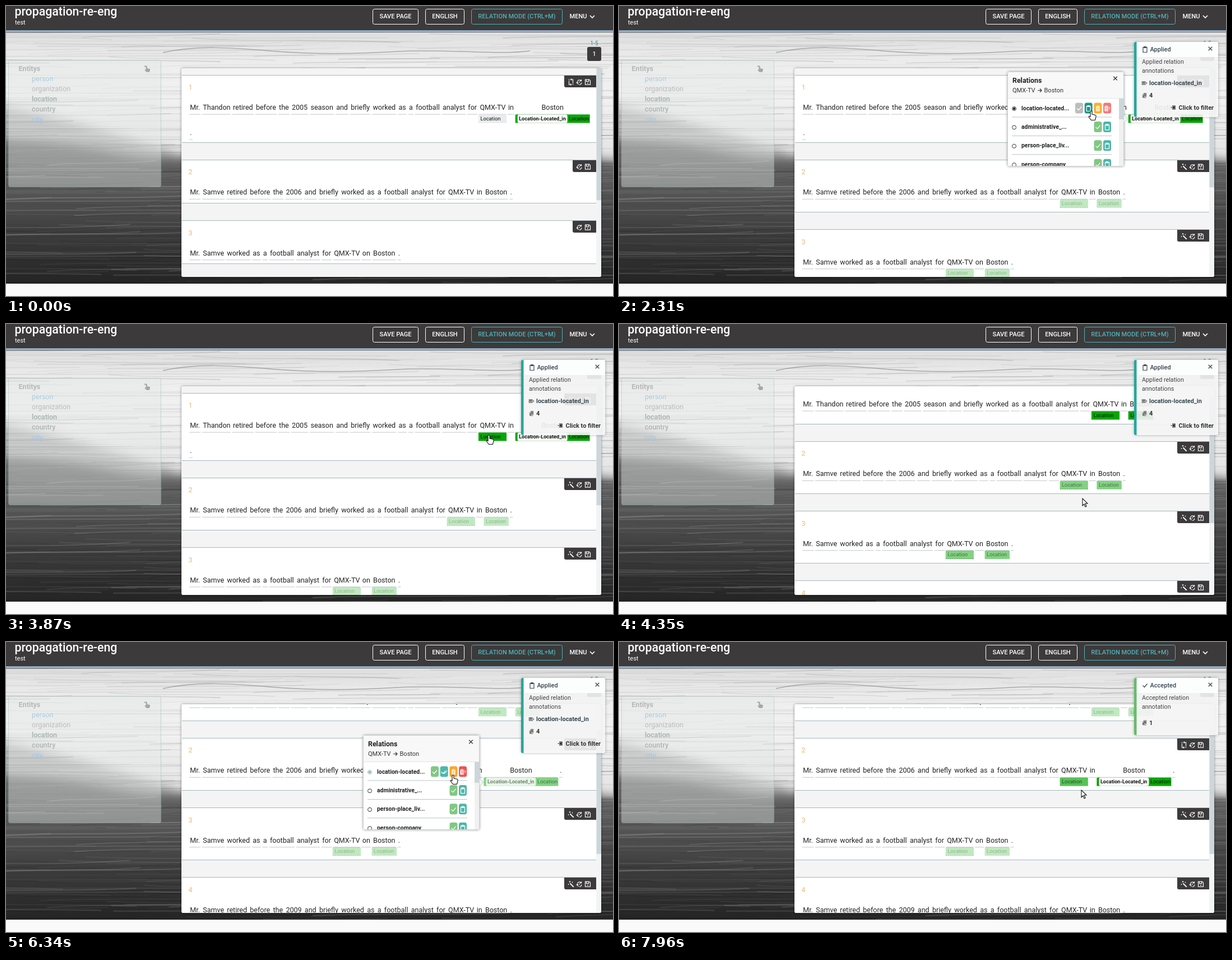
Recreate the animation shown at these times as an HTML page with a canvas. Size 1083 by 517 pixels, loop 8 s.

```html
<!DOCTYPE html>
<html lang="en">
<head>
<meta charset="utf-8">
<title>Relation annotation</title>
<style>
html, body { margin: 0; width: 100%; height: 100%; overflow: hidden; background: #fafafa; }
canvas { display: block; }
</style>
</head>
<body>
<canvas id="stage" width="1083" height="517"></canvas>
<script>
const stage = document.getElementById('stage');
let ctx = stage.getContext('2d');
const LOOP = 8000, DARK = '#3c3a3b', GREEN = '#06a606', TEAL = '#26a69a';
const STATION = 'QMX-TV', WORD_GAP = 5.32;
const slots = { Thandon: 48.3, Samve: 37.7, [STATION]: 45.2 };
const sentences = [
  `Mr. Thandon retired before the 2005 season and briefly worked as a football analyst for ${STATION} in Boston .`,
  `Mr. Samve retired before the 2006 and briefly worked as a football analyst for ${STATION} in Boston .`,
  `Mr. Samve worked as a football analyst for ${STATION} on Boston .`,
  `Mr. Samve retired before the 2009 and briefly worked as a football analyst for ${STATION} in Boston .`,
  `Mr. Samve worked as a football analyst for ${STATION} in Boston .`,
].map(s => s.split(' '));

const icons = {
  check: 'M-4 0l3 3 5-6',
  checks: 'M-5 0l3 3 4-5M-.5 2l1 1 4.5-5',
  clip: 'M-3.5-4h7v9h-7zM-1.5-5h3v2h-3z',
  bin: 'M-2.5-2h5v6.5h-5zM-3.5-3.5h7M-1-4.5h2M-2-1v5M0-1v5M2-1v5',
  binAll: 'M-4-2h5v6.5h-5zM-5-3.5h7M-2.5-4.5h2M-3-1v5M-1-1v5M3-2h2M3 0h2M3 2h1',
  close: 'M-3.3-3.3l6.6 6.6m0-6.6l-6.6 6.6',
  branch: 'M-3.5-5v2M-3.500-2v6.500h3M-1 3l1.500 1.500-1.500 1.500M3.500 5v-2M3.500 2v-6.500h-3M1-6l-1.500 1.500 1.500 1.500',
  wand: 'M5 5l-6.500-6.500M4.300 5.300l-6-6M-2-5.500v2.500M-3.300-4.200h2.600M2.500-4v2M-4.500-.5v2',
  cycle: 'M-3.500-1a4 4 0 0 1 7-1M3.500-4.500v2.700h-2.700M4 1a4 4 0 0 1-3 3.500M2 4.500h-2M-1 4a4 4 0 0 1-3-3.500M-5 2l1-2 2 1M-1 0h2',
  save: 'M-4.500-4.500h7l2 2v7h-9zM-2.500-4v3h4v-3M-1 2h2',
  tag: 'M-4-2h5l3 2.500-3 2.500h-5zM-3-.5h4M-3 1h4',
  copy: 'M-1-4h4v6h-4zM-4-1h3v5h4M0-3v4M1-3v4M2-3v4M-3 0v4M-2 0v4',
  enter: 'M-2-3h5v6h-5M-4.500 0h5M-1-2l2 2-2 2M1.500-2v4',
  arrow: 'M-4 0h7M0-3l3 3-3 3',
  chevron: 'M-4-2l4 4 4-4',
};
for (const name in icons) icons[name] = new Path2D(icons[name]);
const pointer = new Path2D('M0 0v13l3-3 2 5 2-1-2-5h4z');
const hand = new Path2D('M-2 1q1.500-2 3 0v5l6 1.500q1.500.5 1 3l-1.500 6h-7l-4-5q-1-2 .5-2l2 1z');

const ramp = (t, a, b) => {
  const k = Math.min(1, Math.max(0, (t - a) / (b - a)));
  return k * k * (3 - 2 * k);
};
const mix = (a, b, k) => a + (b - a) * k;

function text(s, x, y, size, color, weight = 400, align = 'left') {
  ctx.font = `${weight} ${size}px Roboto, sans-serif`;
  ctx.textAlign = align;
  ctx.fillStyle = color;
  ctx.fillText(s, x, y);
}
function box(x, y, w, h, fill, radius = 0, stroke) {
  ctx.beginPath();
  ctx.roundRect(x, y, w, h, radius);
  if (fill) { ctx.fillStyle = fill; ctx.fill(); }
  if (stroke) { ctx.strokeStyle = stroke; ctx.lineWidth = 1; ctx.stroke(); }
}
function icon(name, x, y, color, width = 1.2) {
  ctx.save();
  ctx.translate(x, y);
  ctx.strokeStyle = color;
  ctx.lineWidth = width;
  ctx.stroke(icons[name]);
  ctx.restore();
}
function group(alpha, draw) {
  if (alpha <= 0) return;
  ctx.save();
  ctx.globalAlpha *= alpha;
  draw();
  ctx.restore();
}
function shadow(blur, color) {
  ctx.shadowBlur = blur;
  ctx.shadowColor = color;
}
function fadeDown(y0, y1, greys) {
  const fade = ctx.createLinearGradient(0, y0, 0, y1);
  greys.forEach((v, i) => fade.addColorStop(i / (greys.length - 1), `rgb(${v},${v},${v})`));
  return fade;
}

// Static layer: brushed backdrop, header, entity list.
function paintBackdrop() {
  ctx.save();
  ctx.beginPath();
  ctx.rect(0, 47, 1083, 448);
  ctx.clip();
  box(0, 47, 1083, 448, fadeDown(47, 290, [222, 238, 240, 232, 225]));
  ctx.filter = 'blur(9px)';
  ctx.fillStyle = 'rgba(90,90,90,.4)';
  ctx.fill(new Path2D('M-40 172Q80 195 190 228T300 262V300H-40Z'));
  ctx.fillStyle = fadeDown(230, 495, [112, 96, 84, 66, 50, 36]);
  ctx.fill(new Path2D('M-40 236Q100 240 180 258T310 268L1000 268L1130 280V540H-40Z'));
  ctx.filter = 'none';
  let seed = 7;
  const rnd = () => (seed = seed * 16807 % 2147483647) / 2147483647;
  for (let i = 0; i < 650; i++) {
    const y = 45 + rnd() * 455, x = rnd() * 1300 - 300, len = 180 + rnd() * 400;
    const tone = rnd() < .5 ? 255 : 25, bend = 10 * rnd() - 4;
    ctx.strokeStyle = `rgba(${tone},${tone},${tone},${.03 + rnd() * .13})`;
    ctx.lineWidth = .5 + rnd() * 1.8;
    ctx.beginPath();
    ctx.moveTo(x, y + bend);
    ctx.bezierCurveTo(x + len * .3, y - bend, x + len * .6, y + bend, x + len, y - bend);
    ctx.stroke();
  }
  ctx.strokeStyle = 'rgba(70,70,70,.4)';
  ctx.lineWidth = 1.5;
  ctx.stroke(new Path2D('M280 83C340 70 400 74 470 80S620 86 700 81 880 88 935 80'));
  ctx.restore();
  box(0, 495, 1083, 22, '#fafafa');
}
function paintHeader() {
  box(0, 0, 1083, 43, DARK);
  box(0, 43, 1083, 1, '#6d7f90');
  box(0, 44, 1083, 2, '#a9c9e8');
  box(0, 46, 1083, 1, '#4d5560');
  text('propagation-re-eng', 15.5, 16.5, 21.3, '#fff', 500);
  text('test', 16, 32.5, 11, '#fff');
  [['SAVE PAGE', 654, 82, '#fff'], ['ENGLISH', 748, 70, '#fff'], ['RELATION MODE (CTRL+M)', 830, 163, '#4fb3b8']]
    .forEach(([label, x, w, color]) => {
      box(x + .5, 5.5, w - 1, 27, null, 3, color);
      text(label, x + w / 2, 22.3, 11.1, color, 500, 'center');
    });
  text('MENU', 1005.5, 22.3, 11.1, '#fff', 500);
  icon('chevron', 1046, 19, '#fff', 1.7);
}
function paintEntities() {
  box(4.5, 96.5, 272, 226, 'rgba(225,231,229,.42)', 3, 'rgba(140,180,170,.4)');
  text('Entitys', 22.5, 115.5, 12.6, '#b6b8b8', 700);
  [['person', '#abcbdc'], ['organization', '#bbbcbc'], ['location', '#a5b2ae', 500],
   ['country', '#b0b3b3', 500], ['city', '#a9c6e2', 500]]
    .forEach(([name, color, weight], i) => text(name, 46, 133.5 + i * 18.3, 12.5, color, weight));
  ctx.save();
  ctx.translate(251, 107);
  ctx.scale(.75, .65);
  ctx.fillStyle = '#a5a7a7';
  ctx.fill(hand);
  ctx.restore();
  box(246.5, 106.5, 5, 2, '#a5a7a7', 1);
}

function tag(x, y, w, fill, alpha, pending) {
  group(alpha, () => {
    box(x, y, w, 15, fill);
    text('Location', x + 3.5, y + 10, 9.3, '#111');
    if (!pending) return;
    ctx.setLineDash([2, 2]);
    ctx.lineWidth = 1;
    ctx.strokeStyle = '#2c5c2c';
    ctx.beginPath();
    ctx.moveTo(x, y + 14.5);
    ctx.lineTo(x + w, y + 14.5);
    ctx.stroke();
  });
}
function relationTag(x, y, alpha) {
  group(alpha, () => {
    box(x, y, 133, 15, GREEN);
    text('Location', x + 95.5, y + 10, 9.3, '#111');
  });
  group(Math.min(1, alpha + .3), () => box(x + 4, y, 89, 15, '#fff', 3));
  group(alpha, () => text('Location-Located_in', x + 6.5, y + 10.5, 9.15, '#111', 700));
}

function drawWords(words, top, s) {
  let x = 328.3, line = top;
  for (const word of words) {
    ctx.font = '400 12.5px Roboto, sans-serif';
    const own = slots[word] ?? ctx.measureText(word).width;
    const place = word === 'Boston', wide = place && s.related;
    const w = wide ? 128 : own;
    if (x + w > 1043) { x = 328.3; line += 45; }
    text(word, x + (w - own) / 2, line + 61.5, 12.5, '#222');
    box(x - 1.3, line + 69, w + 2.6, 1.2, '#ccd3d8');
    if (s.tagged && (place || word === STATION)) {
      if (wide) relationTag(x - 2.5, line + 70, s.relAlpha);
      else tag(x - 2.5, line + 70, w + 5, place ? GREEN : s.fill || GREEN, place ? s.alpha : s.stationAlpha ?? s.alpha, s.pending && !place);
    }
    x += w + WORD_GAP;
  }
}
function drawTools(top, names) {
  const left = 1053 - (names.length > 2 ? 57 : 42);
  box(left, top, 1053 - left, 21, DARK, [0, 0, 0, 3]);
  names.forEach((name, i) => icon(name, 1038 - 15 * (names.length - 1 - i), top + 11.5, '#f2f2f2', 1.25));
}

function drawList(t) {
  const applied = t >= 2310, accepted = t >= 6880, open1 = t < 4020;
  const scroll = 38 * (ramp(t, 4100, 4260) + ramp(t, 4400, 4540));
  const wake = ramp(t, 3950, 4300), dim = ramp(t, 4750, 5250);
  const soft = mix(.25, .5, wake), rest = mix(soft, .25, dim);
  const states = sentences.map((_, i) => ({ tagged: applied, pending: true, alpha: rest }));
  states[0] = { tagged: true, related: open1, relAlpha: 1, alpha: mix(1, .25, dim), fill: t < 2970 ? '#e9ecec' : GREEN };
  states[1] = {
    tagged: applied, pending: !accepted, related: t >= 4900, alpha: soft, relAlpha: accepted ? 1 : .5,
    stationAlpha: accepted ? mix(.42, .68, ramp(t, 7400, 7960)) : mix(soft, .42, dim),
  };
  const heights = sentences.map((_, i) => i === 0 ? (open1 ? 120 : 93) : applied ? 93 : 77);
  const content = 160 + heights.reduce((a, b) => a + b);

  ctx.save();
  shadow(4, 'rgba(0,0,0,.4)');
  box(313, 111, 749, 372, '#f4f4f4', 3);
  ctx.restore();
  ctx.save();
  ctx.beginPath();
  ctx.roundRect(313, 111, 749, 372, 3);
  ctx.clip();
  let top = 123.5 - scroll;
  sentences.forEach((words, i) => {
    const h = heights[i], y = Math.round(top), bottom = Math.round(top + h);
    box(314, y, 739, bottom - y, '#fff');
    box(314, y - 1, 739, 1, '#a3b8ba');
    box(314, bottom - 1, 739, 1, '#a3b8ba');
    text(i + 1, 325.5, top + 25.5, 12.5, '#efc88f', 500);
    drawWords(words, top, states[i]);
    const tools = ['cycle', 'save'];
    if (i === 0 && !applied || i === 1 && accepted) tools.unshift('branch');
    else if (applied) tools.unshift('wand');
    drawTools(y, tools);
    top += h + 31.3;
  });
  box(1053.5, 111, 8.5, 372, '#f2f4f5');
  box(1053.5, 111 + scroll * 372 / content, 8.5, 372 * 372 / content, '#cdd6db');
  ctx.restore();
}

function actionButton(x, y, name, color) {
  box(x - 7, y - 9.5, 14, 19, color, 3.5);
  icon(name, x, y + .5, '#fff', 1.2);
}
function drawPopup(x, y, marked, actions) {
  ctx.save();
  shadow(4, 'rgba(0,0,0,.4)');
  box(x, y, 208, 169, '#fff', 3);
  ctx.restore();
  ctx.fillStyle = '#f1f3f3';
  ctx.strokeStyle = '#c4cccc';
  ctx.lineWidth = 1;
  ctx.beginPath();
  ctx.moveTo(x + 208, y + 77);
  ctx.lineTo(x + 215, y + 84);
  ctx.lineTo(x + 208, y + 91);
  ctx.fill();
  ctx.stroke();
  ctx.beginPath();
  ctx.roundRect(x, y, 208, 169, 3);
  ctx.clip();
  box(x, y, 208, 47.5, '#f8f8f8');
  box(x, y + 47, 208, 1, '#e2e4e4');
  text('Relations', x + 9, y + 20, 12.4, '#222', 700);
  text(STATION, x + 9, y + 36.5, 11, '#333');
  icon('arrow', x + 58, y + 33.5, '#333');
  text('Boston', x + 65.5, y + 36.5, 11, '#333');
  icon('close', x + 192.5, y + 12, '#333', 1.3);
  ['location-located...', 'administrative_...', 'person-place_liv...', 'person-company'].forEach((name, i) => {
    const row = y + 65 + i * 33.4;
    ctx.beginPath();
    ctx.arc(x + 12, row + 1, 3.5, 0, 7);
    ctx.strokeStyle = i || marked === '#222' ? '#333' : '#9bbcb6';
    ctx.lineWidth = 1;
    ctx.stroke();
    if (!i) {
      ctx.beginPath();
      ctx.arc(x + 12, row + 1, 2.2, 0, 7);
      ctx.fillStyle = marked;
      ctx.fill();
    }
    text(name, x + 25, row + 3.5, 10.4, '#222', 700);
    if (i) {
      actionButton(x + 161.5, row, 'check', '#81c784');
      actionButton(x + 178, row, 'clip', '#4db6ac');
    } else actions.forEach(([glyph, color], k) => actionButton(x + 128 + k * 16.7, row, glyph, color));
    box(x + 8, row + 15.5, 178, 1, '#b9c4c6');
  });
  box(x + 199, y + 48, 8.5, 121, '#f1f1f1');
  box(x + 199, y + 48, 8.5, 37, '#cdd6db');
  box(x + .5, y + .5, 207, 168, null, 3, '#d0d4d4');
}

function drawToast(h, color, glyph, title, lines) {
  ctx.save();
  shadow(5, 'rgba(0,0,0,.35)');
  box(919, 64, 150, h, 'rgba(255,255,255,.87)', 3);
  ctx.restore();
  box(919, 64, 150, 27, '#fcfdfd', [3, 3, 0, 0]);
  box(919, 64, 4.5, h, color, [3, 0, 0, 3]);
  icon(glyph, 938.5, 77.5, '#37474f');
  text(title, 947.5, 81.3, 11, '#37474f', 500);
  icon('close', 1055, 76, '#555', 1.6);
  lines.forEach((line, i) => text(line, 933, 102.5 + i * 16, 10.8, '#444'));
}
function appliedToast() {
  drawToast(134, TEAL, 'clip', 'Applied', ['Applied relation', 'annotations']);
  icon('tag', 937.5, 137, '#777', 1.5);
  text('location-located_in', 946, 140.5, 10.9, '#37474f', 700);
  icon('copy', 937.5, 159.5, '#777');
  text('4', 946, 163, 11, '#333', 700);
  icon('enter', 989, 181, '#222');
  text('Click to filter', 998.5, 185, 10.9, '#333', 700);
}
function acceptedToast() {
  drawToast(102, '#66bb6a', 'check', 'Accepted', ['Accepted relation', 'annotation']);
  icon('copy', 937.5, 144, '#777');
  text('1', 946, 147.5, 11, '#333', 700);
}

// Cursor stops: time, x, y.
const route = [[70, 936, 300], [830, 919, 199], [1030, 919, 199], [1580, 843, 187], [2970, 843, 187],
  [3350, 948, 376], [3730, 882, 226], [3870, 862, 198], [3950, 862, 198], [4350, 827, 311], [4620, 827, 311],
  [5050, 829, 256], [5440, 829, 256], [5720, 872, 296], [6180, 798, 237], [6340, 798, 237], [6560, 766, 231],
  [7400, 766, 231], [7940, 825, 264], [8000, 825, 264]];
const handTimes = [[1480, 3050], [3800, 3990], [4900, 5520], [6050, 7500]];
function drawCursor(t) {
  const i = route.findIndex(stop => stop[0] > t);
  if (i < 1) return;
  const [t0, x0, y0] = route[i - 1], [t1, x1, y1] = route[i], k = ramp(t, t0, t1);
  const shape = handTimes.some(([a, b]) => t >= a && t < b) ? hand : pointer;
  ctx.save();
  ctx.translate(mix(x0, x1, k), mix(y0, y1, k));
  ctx.fillStyle = '#fff';
  ctx.strokeStyle = '#111';
  ctx.lineWidth = 1.1;
  ctx.fill(shape);
  ctx.stroke(shape);
  ctx.restore();
}

const view = ctx;
const base = document.createElement('canvas');
base.width = stage.width;
base.height = stage.height;
ctx = base.getContext('2d');
paintBackdrop();
paintHeader();
paintEntities();
text('1-5', 1049.5, 69.5, 10, '#4a8288', 400, 'center');
box(1037, 73, 25, 25, DARK, 3);
text('1', 1049.5, 88.5, 10, '#fff', 500, 'center');
ctx = view;

function frame(now) {
  const t = now % LOOP;
  ctx.drawImage(base, 0, 0);
  drawList(t);
  group(ramp(t, 70, 350) * (1 - ramp(t, 3050, 3400)), () => drawPopup(693, 117, '#222', [
    ['check', '#bdbdbd'], ['clip', t < 1980 ? '#4db6ac' : '#17988b'], ['bin', '#fbb02d'], ['binAll', '#ef7b78']]));
  group(ramp(t, 5450, 5700) * (1 - ramp(t, 7420, 7700)), () => drawPopup(637, 166, t < 6880 ? '#8fb8b0' : '#222', [
    ['check', t < 6880 ? '#81c784' : '#bdbdbd'], ['checks', '#4db6ac'], ['bin', '#fba62c'], ['binAll', '#ef5350']]));
  if (t >= 2310) group(1 - ramp(t, 6360, 6600), appliedToast);
  group(ramp(t, 6860, 7130), acceptedToast);
  drawCursor(t);
  requestAnimationFrame(() => frame(performance.now()));
}
frame(performance.now());
</script>
</body>
</html>
```
